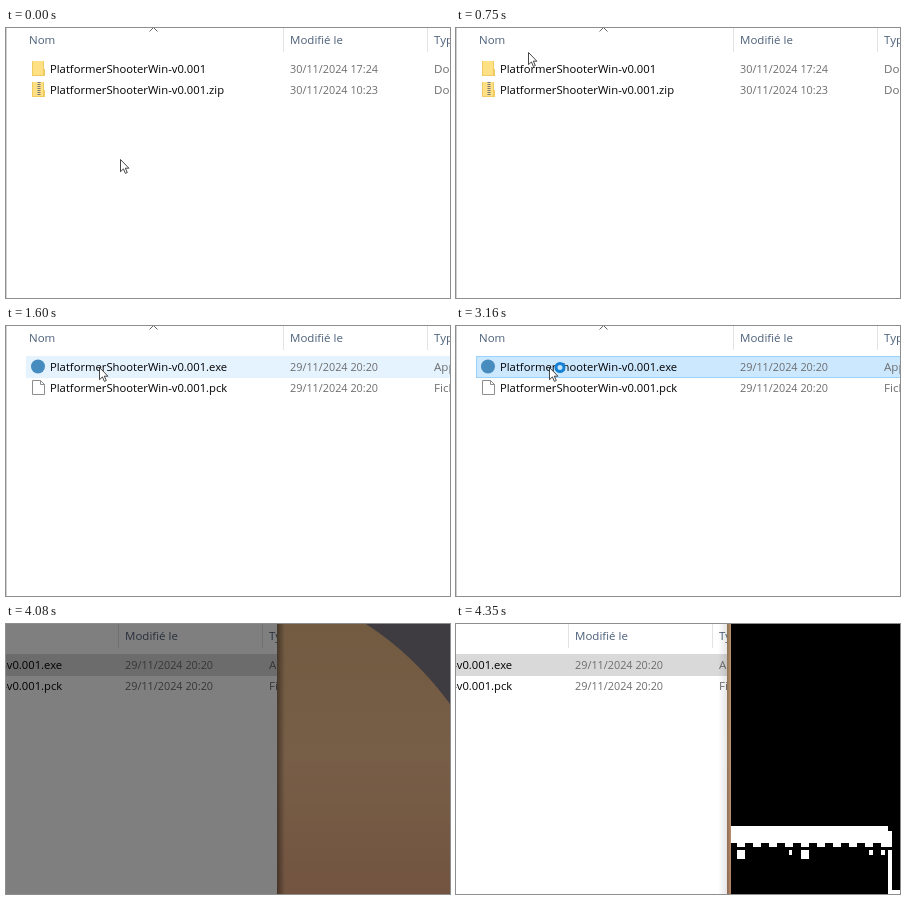
These frames come from a looping animation (444 by 270 pixels, 4.76 s). An HTML page:

```html
<!DOCTYPE html>
<html lang="fr">
<head>
<meta charset="utf-8">
<title>Explorateur</title>
<style>
  html, body { margin: 0; width: 100%; height: 100%; overflow: hidden; background: #fff; }
  svg { display: block; width: 444px; height: 270px; }
  text { font: 11.25px "Open Sans", "Noto Sans", sans-serif; }
  .head { font-size: 11.5px; fill: #4c607a; }
  .info { font-size: 10.85px; fill: #6d6d6d; }
  .type { font-size: 11.6px; fill: #6d6d6d; }
</style>
</head>
<body>
<svg viewBox="0 0 444 270">
  <defs>
    <linearGradient id="sand" x2="0" y2="1">
      <stop stop-color="#e6b884"/>
      <stop offset=".5" stop-color="#f0bd90"/>
      <stop offset="1" stop-color="#e6aa82"/>
    </linearGradient>
    <linearGradient id="fadeLeft"><stop stop-opacity="0"/><stop offset="1" stop-opacity=".1"/></linearGradient>
    <linearGradient id="fadeRight"><stop stop-opacity=".4"/><stop offset="1" stop-opacity="0"/></linearGradient>
    <clipPath id="view"><rect id="pane" width="444" height="270"/></clipPath>
    <g id="folder">
      <path d="M26 33h12v8h1v7H26z" fill="#f0cb62"/>
      <path d="M27 33h10v14H27z" fill="#ffe084"/>
    </g>
  </defs>

  <g id="desktop">
    <path d="M271 0h173v270H271z" fill="url(#sand)"/>
    <path d="M360 0Q408 31 444 80V0z" fill="#7e7883"/>
    <path d="M271 0h8v270h-8z" fill="url(#fadeRight)"/>
  </g>

  <g clip-path="url(#view)">
    <g id="explorer">
      <path d="M0 0h609v270H0z" fill="#fff"/>
      <path d="M0 0h1v270H0z" fill="#cfcfcf"/>
      <path d="M277.5 0v24M421.5 0v24" stroke="#e3e3e3"/>
      <path d="M143.5 3.5l4-4 4 4" fill="none" stroke="#666"/>
      <text class="head" x="23" y="16">Nom</text>
      <text class="head" x="284" y="16">Modifié le</text>
      <text class="head" x="428" y="16">Type</text>
      <rect id="mark" x="20.5" y="30.5" width="480" height="21"/>
      <g id="outer">
        <use href="#folder"/>
        <use href="#folder" y="21"/>
        <path d="M33 54v13" stroke="#777" stroke-width="3" stroke-dasharray="1 1"/>
      </g>
      <g id="inner">
        <circle cx="32" cy="40.5" r="7" fill="#478cbf"/>
        <path d="M26.5 54.5h8l4 4v10h-12zM34.5 54.5v4h4" fill="#fff" stroke="#8d8d8d"/>
      </g>
    </g>
  </g>

  <g id="game">
    <path d="M262 0h9v270h-9z" fill="url(#fadeLeft)"/>
    <path d="M275 0h169v270H275z"/>
    <g id="level" fill="#fff" shape-rendering="crispEdges"></g>
  </g>
  <rect id="dim" width="444" height="270" opacity=".5"/>

  <g id="cursor">
    <path d="M.5.5v12.2l2.9-2.8 2 4.5 1.9-.9-2-4.3h3.6z" fill="#fff" stroke="#333" stroke-width=".9"/>
    <circle id="busy" cx="11" cy=".5" r="4" fill="#bfe3fa" stroke="#1581d6" stroke-width="3"/>
  </g>
</svg>
<script>
const $ = id => document.getElementById(id);
const show = (id, on) => $(id).style.display = on ? "" : "none";

function addRow(group, y, name, date, type) {
  $(group).innerHTML += `<text x="44" y="${y}">${name}</text>
    <text class="info" x="284" y="${y}">${date}</text>
    <text class="type" x="428" y="${y}">${type}</text>`;
}
const base = "PlatformerShooterWin-v0.001";
addRow("outer", 45, base, "30/11/2024 17:24", "Dossier de fichiers");
addRow("outer", 66, base + ".zip", "30/11/2024 10:23", "Dossier compressé");
addRow("inner", 45, base + ".exe", "29/11/2024 20:20", "Application");
addRow("inner", 66, base + ".pck", "29/11/2024 20:20", "Fichier PCK");

// Level tiles: ceiling with teeth, hanging blocks, right wall and floor
let tiles = "M275 202h157v5h4v12H275zM432 219h4v4h-4zM432 226h4v40h8v4h-12z" +
  "M281 226h8v9h-8zM345 226h8v9h-8zM333 226h3v5h-3zM413 226h4v5h-4zM425 226h4v5h-4z";
for (let x = 281; x < 430; x += 16) tiles += `M${x} 219h8v4h-8z`;
$("level").innerHTML = `<path d="${tiles}"/>`;

// [time, x, y] of the pointer, held until the next entry
const moves = [
  [0, 114, 131], [300, 111, 131], [450, 107, 133], [600, 76, 86], [750, 72, 24],
  [870, 93, 41], [3280, 110, 66], [3400, 401, 236], [3540, 406, 251], [3660, 409, 262]
];
// [time, fill, border] of the highlighted row
const marks = [
  [0, "none", "none"], [870, "#e5f3ff", "#e5f3ff"], [1160, "#cce8ff", "#99d1ff"],
  [1600, "#e5f3ff", "#e5f3ff"], [3160, "#cce8ff", "#99d1ff"], [4080, "#d9d9d9", "#d9d9d9"]
];
const at = (list, t) => list.findLast(step => step[0] <= t);

function draw(now) {
  const t = now % 4760, launched = t >= 4080;
  const [, x, y] = at(moves, t), [, fill, stroke] = at(marks, t);
  $("cursor").setAttribute("transform", `translate(${x} ${y})`);
  $("mark").setAttribute("fill", fill);
  $("mark").setAttribute("stroke", stroke);
  $("explorer").setAttribute("transform", `translate(${launched ? -165 : 0})`);
  $("pane").setAttribute("width", launched ? 271 : 444);
  show("cursor", t < 3800);
  show("busy", t >= 3160 && t < 3280);
  show("outer", t < 1600);
  show("inner", t >= 1600);
  show("desktop", launched);
  show("dim", launched && t < 4230);
  show("game", t >= 4230);
  show("level", t >= 4350);
  requestAnimationFrame(draw);
}
draw(0);
</script>
</body>
</html>
```
